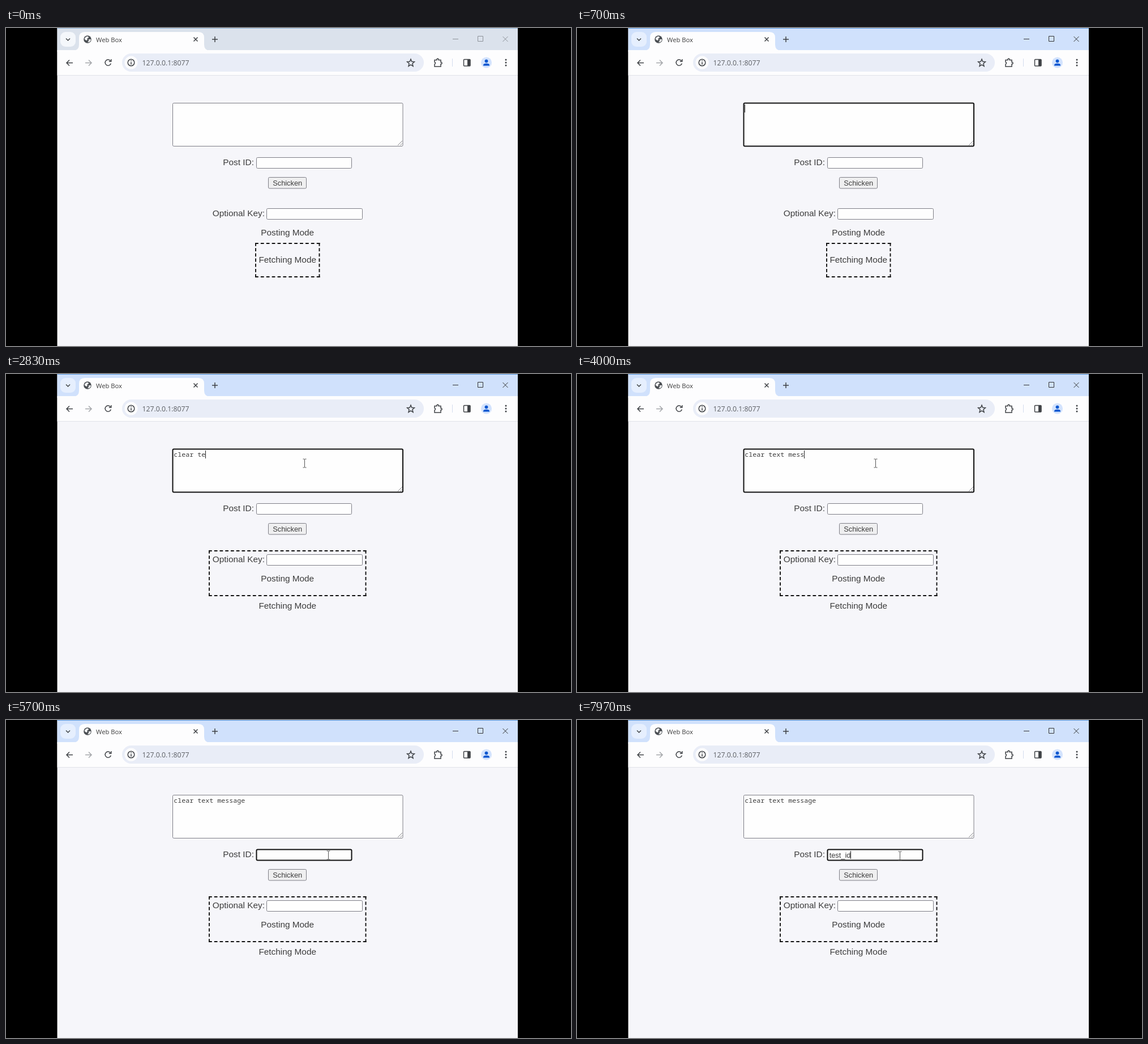
Animation, 998 px wide and 561 px high, one loop 8 s. Source, as an HTML page:

```html
<!DOCTYPE html>
<html lang="en">
<head>
<meta charset="utf-8">
<title>Web Box</title>
<style>
html, body { margin: 0; width: 100%; height: 100%; overflow: hidden; background: #000; }
svg { display: block; }
text { white-space: pre; fill: #3c3c3c; }
.ui { font-family: "Open Sans", sans-serif; }
.page { font: 15.37px "Liberation Sans", Arial, sans-serif; }
.small { font: 12.8px "Liberation Sans", Arial, sans-serif; }
.mono { font: 11.67px "Noto Sans Mono", monospace; }
.mid { text-anchor: middle; }
.icon { fill: none; stroke: #3f4246; stroke-width: 1.5; }
.field { fill: #fefefe; stroke: #7e7e86; }
.field.focus { stroke: #111; stroke-width: 2; }
.dash { fill: none; stroke: #111; stroke-width: 1.9; }
.caret { stroke: #222; }
</style>
</head>
<body>
<svg width="998" height="561" viewBox="0 0 998 561">
  <rect width="998" height="561"/>
  <rect x="90.5" width="813.5" height="561" fill="#f6f6fa"/>

  <!-- Title bar -->
  <rect id="bar" x="90.5" width="813.5" height="42"/>
  <rect id="edge" x="90.5" width="813.5" height="1"/>
  <rect id="menu" x="96" y="7" width="27" height="26" rx="9"/>
  <path class="icon" d="M106 18.5l3.5 3.5 3.5-3.5"/>
  <path fill="#fdfdfe" d="M119 39.5q10 0 10-10V17q0-10 10-10h201q10 0 10 10v12.500q0 10 10 10z"/>
  <circle cx="144" cy="20" r="6.8" fill="#4b4f54"/>
  <path fill="#fdfdfe" d="M139 18q3-4 6-3l1 2-3 2 1 2-2 1-3-2zM146 20l4 0q0 3-3 5l-3 0 2-2z"/>
  <text class="ui" x="159" y="24.500" font-size="11.2">Web Box</text>
  <path class="icon" d="M331.500 16.500l7 7m0-7l-7 7M364 20h10m-5-5v10"/>
  <path id="caption" fill="none" d="M789 19.500h10M833.500 14.500h9v9h-9zM877.500 15l9 9m0-9l-9 9"/>

  <!-- Toolbar -->
  <rect x="90.500" y="39" width="813.500" height="44" fill="#fdfdfe"/>
  <path stroke="#e0e2e8" d="M90.500 83.500h813.500"/>
  <rect x="205" y="45" width="533" height="32" rx="16" fill="#e9edf7"/>
  <path class="icon" d="M118 61.500h-11m5-5l-5 5 5 5"/>
  <path class="icon" style="stroke:#a4a6aa" d="M140 61.500h11m-5-5l5 5-5 5"/>
  <path class="icon" d="M184.500 58a5.200 5.200 0 1 0 .8 4.500M185.800 55v4h-4"/>
  <circle cx="221" cy="61" r="11.500" fill="#fdfdfe"/>
  <circle class="icon" cx="221" cy="61" r="5.800"/>
  <path class="icon" d="M221 60v4.500m0-7.500v1.500"/>
  <text class="ui" x="240.500" y="65.500" font-size="12.25" style="fill:#5b5e63">127.0.0.1:8077</text>
  <path class="icon" d="M715 55l1.800 4.300 4.600.4-3.500 3 1.100 4.600-4-2.500-4 2.500 1.100-4.600-3.500-3 4.600-.4z"/>
  <path class="icon" d="M757 56.500h4v-1.500q1.500-2 3 0v1.500h4v4h1.200q2 1.500 0 3h-1.200v4.500h-11v-4q3-2.500 0-4z"/>
  <path stroke="#d3dcee" d="M788.500 54v14"/>
  <rect class="icon" x="808.500" y="55.500" width="11.500" height="11.500" rx="1"/>
  <path fill="#3f4246" d="M815 55.500h5v11.500h-5z"/>
  <circle cx="848.500" cy="61" r="9.500" fill="#d3e3fd"/>
  <path fill="#0b57d0" d="M843 66.500v-1q0-3 5.500-3t5.500 3v1z"/>
  <circle cx="848.500" cy="58.300" r="2.900" fill="#0b57d0"/>
  <g fill="#3f4246"><circle cx="883" cy="56" r="1.500"/><circle cx="883" cy="61" r="1.500"/><circle cx="883" cy="66" r="1.500"/></g>

  <!-- Form -->
  <rect id="message" class="field" x="294.500" y="132.500" width="406.500" height="76" rx="2"/>
  <path stroke="#85858a" d="M692 207l8-8m-3.500 8l3.500-3.500"/>
  <text id="messageText" class="mono" x="296.300" y="146"></text>
  <text class="page" x="383.300" y="242">Post ID:</text>
  <rect id="post" class="field" x="442.500" y="228.500" width="168" height="19" rx="2"/>
  <text id="postText" class="small" x="445.700" y="242.500"></text>
  <rect x="463.500" y="263.500" width="67" height="19.500" rx="2" fill="#efeff0" stroke="#7e7e86"/>
  <text class="small mid" x="497.200" y="277.500">Schicken</text>
  <text class="page" x="364.800" y="332">Optional Key:</text>
  <rect class="field" x="460.500" y="318.500" width="169" height="19" rx="2"/>
  <text class="page mid" x="497.200" y="366">Posting Mode</text>
  <text class="page mid" x="497.200" y="414">Fetching Mode</text>
  <g id="posting" class="dash"></g>
  <g id="fetching" class="dash"></g>
  <path id="caret" class="caret" d="M.5 0v14"/>

  <!-- Pointers -->
  <path id="beam" fill="none" stroke="#555" d="M-3-7.500h2.500l.500.500.500-.500h2.500M0-7v14M-3 7.500h2.500l.500-.500.500.500h2.500"/>
  <path id="arrow" fill="#fff" stroke="#333" d="M0 0v14.500l3.400-3.100 2.500 5.600 2.300-1-2.400-5.400h4.700z"/>
</svg>
<script>
const LOOP = 8000, BLINK = 530, ACTIVATE = 680, CLICK = 5165, POINTER_IN = 800;
const message = 'clear text message', postId = 'test_id';
const messageKeys = [2030, 2200, 2300, 2430, 2630, 2700, 2740, 2830, 2970, 3200,
  3330, 3500, 3730, 3870, 4000, 4130, 4270, 4400];
const postKeys = [6400, 6600, 6850, 7330, 7500, 7830, 7930];
const pointerPath = [[4700, 527.5, 157.5], [4800, 567, 230.5], [4870, 569.5, 238.5],
  [6100, 569.5, 238.5], [6500, 570.5, 239.5]];
const $ = id => document.getElementById(id);
const show = (el, on) => el.setAttribute('visibility', on ? 'visible' : 'hidden');
const move = (el, x, y) => el.setAttribute('transform', `translate(${x} ${y})`);

// Each side begins and ends with a whole dash, as a CSS border does.
function dashedBox(id, x, y, w, h) {
  const side = (d, length) => {
    const dash = 5.76, gaps = Math.round((length - dash) / (dash + 3.84));
    const gap = (length - dash * (gaps + 1)) / gaps;
    return `<path d="${d}" stroke-dasharray="${dash} ${gap}"/>`;
  };
  $(id).innerHTML = side(`M${x} ${y + 1}h${w}`, w) + side(`M${x} ${y + h - 1}h${w}`, w) +
    side(`M${x + 1} ${y}v${h}`, h) + side(`M${x + w - 1} ${y}v${h}`, h);
}

function pointerAt(t) {
  const next = pointerPath.findIndex(p => p[0] > t);
  if (next === 0) return pointerPath[0].slice(1);
  if (next < 0) return pointerPath.at(-1).slice(1);
  const [t0, x0, y0] = pointerPath[next - 1], [t1, x1, y1] = pointerPath[next];
  const k = (t - t0) / (t1 - t0);
  return [x0 + (x1 - x0) * k, y0 + (y1 - y0) * k];
}

function draw(t) {
  const active = t >= ACTIVATE, inPost = t >= CLICK;
  $('bar').setAttribute('fill', active ? '#d0e1fc' : '#dbe2ec');
  $('edge').setAttribute('fill', active ? '#5b9be3' : '#94b8dc');
  $('menu').setAttribute('fill', active ? '#e6effe' : '#f4f7fb');
  $('caption').setAttribute('stroke', active ? '#333' : '#8d9299');
  $('message').classList.toggle('focus', active && !inPost);
  $('post').classList.toggle('focus', inPost);

  const typed = keys => keys.filter(k => k <= t);
  const messageTyped = typed(messageKeys), postTyped = typed(postKeys);
  $('messageText').textContent = message.slice(0, messageTyped.length);
  $('postText').textContent = postId.slice(0, postTyped.length);
  const isPosting = messageTyped.length > 0 && t >= messageKeys[0] + 35;
  show($('posting'), isPosting);
  show($('fetching'), !isPosting);

  const field = $(inPost ? 'postText' : 'messageText');
  const lastInput = (inPost ? postTyped : messageTyped).at(-1) ?? (inPost ? CLICK : ACTIVATE);
  const width = field.textContent ? field.getComputedTextLength() : 0;
  move($('caret'), Math.round(+field.getAttribute('x') + width), inPost ? 231 : 135);
  show($('caret'), active && Math.floor((t - lastInput) / BLINK) % 2 === 0);

  const [x, y] = pointerAt(t);
  const overText = y < 209 || t >= 4840;
  move($('beam'), x, y);
  move($('arrow'), x, y);
  show($('beam'), t >= POINTER_IN && overText);
  show($('arrow'), !overText);
}

dashedBox('posting', 358, 311, 278.500, 81);
dashedBox('fetching', 440, 379, 114.500, 61);
const start = performance.now();
function tick() {
  draw((performance.now() - start) % LOOP);
  requestAnimationFrame(tick);
}
tick();
</script>
</body>
</html>
```
